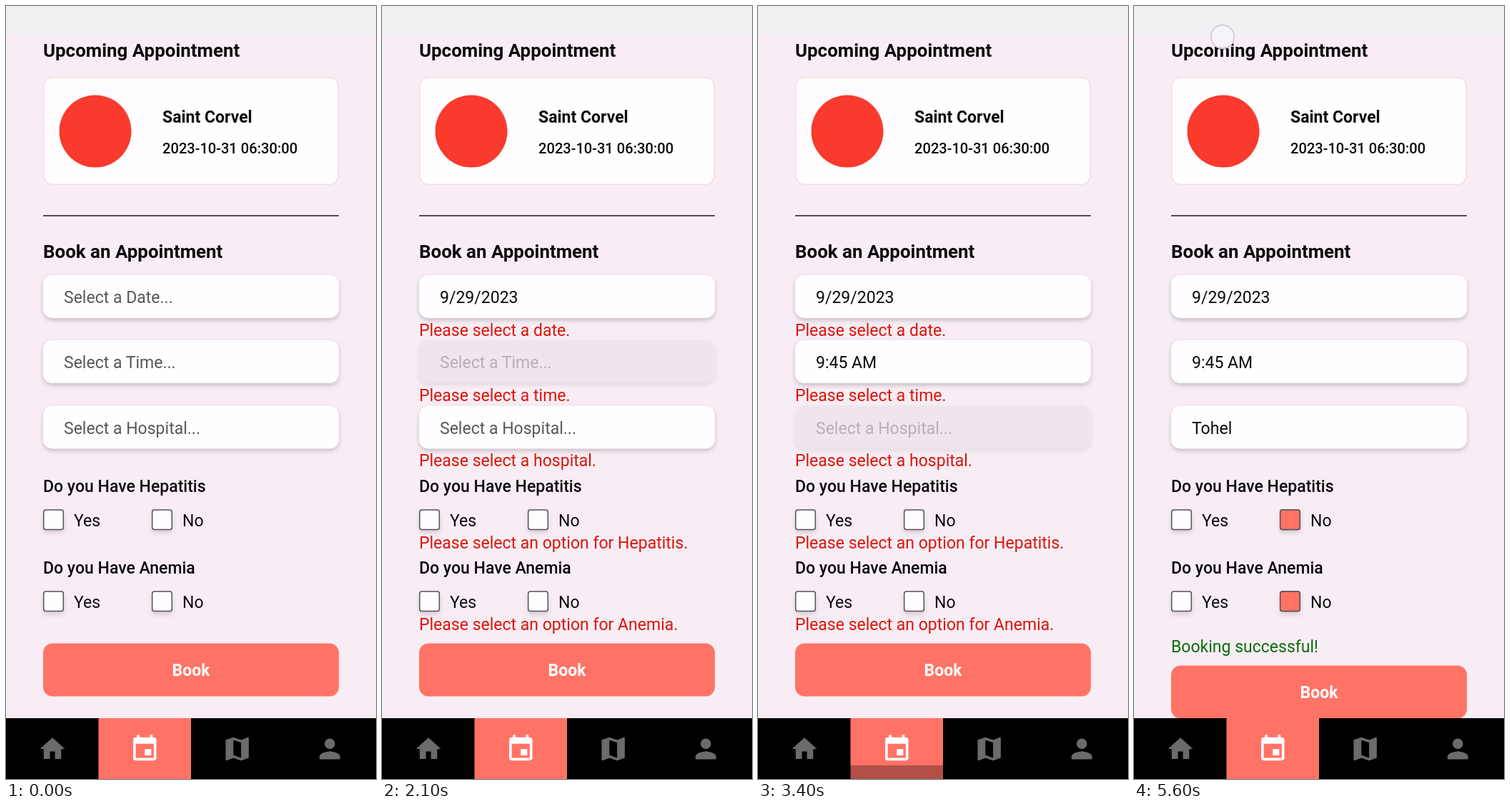
Animation, 518 px wide and 1080 px high, one loop 5.8 s. Source, as an HTML page:

```html
<!DOCTYPE html>
<html lang="en">
<head>
<meta charset="utf-8">
<title>Book an Appointment</title>
<style>
  html, body { margin: 0; width: 100%; height: 100%; overflow: hidden; background: #f8edf4; }
  svg { display: block; width: 100vw; height: 100vh; }
  text { font: 400 23.03px Roboto, sans-serif; fill: #0b0a0c; }
  .title { font-size: 25.9px; font-weight: 700; }
  .bold { font-weight: 700; }
  .med { font-weight: 500; }
  .s14 { font-size: 20.15px; font-weight: 500; }
  .s12 { font-size: 17.27px; }
  .mid { text-anchor: middle; }
  .hint { fill: #59565c; }
  .err { fill: #da160c; }
  .ok { fill: #0b6e0b; }
  .white { fill: #fff; }
  .soft { fill: #b4d0ea; }
  .grey { fill: #7d7b80; }
  .blue { fill: #126bb7; }
  .btn { letter-spacing: 1.8px; }
  .big { font-size: 48.9px; font-weight: 500; }
  .clock { font-size: 86.4px; }
  .pill { fill: #fffdff; filter: drop-shadow(0 3px 3px rgba(0, 0, 0, .2)); }
  .box { fill: #fffdff; stroke: #555257; stroke-width: 1.5; filter: drop-shadow(0 4px 3px rgba(0, 0, 0, .13)); }
  .sheet { fill: #fffdff; filter: drop-shadow(0 8px 14px rgba(0, 0, 0, .45)); }

  .press { animation: press 5.8s infinite; }
  .press .pill { animation: tint 5.8s infinite; animation-delay: inherit; }
  @keyframes press {
    0%, 7.7%, 100% { opacity: 1; }
    1.7%, 3.5% { opacity: .4; }
  }
  @keyframes tint {
    0%, 7.7%, 100% { fill: #fffdff; }
    1.7%, 3.5% { fill: #dfdce0; }
  }
  .dialog { opacity: 0; animation: dialog 5.8s infinite linear; }
  @keyframes dialog {
    0%, 19.9%, 100% { opacity: 0; }
    3.4%, 17.2% { opacity: 1; }
  }
  .slide { transform: translateY(1080px); animation: slide 5.8s 3.38s infinite cubic-bezier(.4, 0, .2, 1); }
  @keyframes slide {
    0%, 8.3%, 100% { transform: translateY(1080px); }
    4.3%, 5.5% { transform: none; }
  }
  .drop { animation: drop 5.8s infinite step-end; }
  @keyframes drop {
    0% { transform: none; }
    84.4% { transform: translateY(31px); }
  }
</style>
</head>
<body>
<svg id="stage" viewBox="0 0 518 1080" preserveAspectRatio="none"></svg>
<script>
const LOOP = 5800;

const text = (x, y, s, cls = '', more = '') => `<text x="${x}" y="${y}" class="${cls}" ${more}>${s}</text>`;
const rect = (x, y, w, h, more = '') => `<rect x="${x}" y="${y}" width="${w}" height="${h}" ${more}/>`;
const icon = (x, y, k, fill, d) =>
  `<path transform="translate(${x - 12 * k} ${y - 12 * k}) scale(${k})" fill="${fill}" d="${d}"/>`;
// Visible only between two times of the loop
const during = (from, to, body) => `<g data-on="${from} ${to}">${body}</g>`;
const pressed = (at, body) => `<g class="press" style="animation-delay:${at}ms">${body}</g>`;

const field = (y, hint, value, tap, set) => pressed(tap,
  rect(52, y, 414, 60, 'rx="13" class="pill"') +
  during(0, set, text(81, y + 39, hint, 'hint')) +
  during(set, LOOP, text(81, y + 39, value)));

const question = (y, label, set) =>
  text(52, y, label, 'med') +
  [[52, 'Yes'], [204, 'No']].map(([x, s]) =>
    rect(x + .7, y + 25, 27.6, 27.6, 'rx="3" class="box"') + text(x + 43, y + 48, s)).join('') +
  during(set, LOOP, rect(204.7, y + 25, 27.6, 27.6, 'rx="3" fill="#ff7366" stroke="#555257" stroke-width="1.5"'));

const errors = [
  [461, 'a date'], [552, 'a time'], [643, 'a hospital'],
  [758, 'an option for Hepatitis'], [872, 'an option for Anemia']
].map(([y, s]) => text(52, y, `Please select ${s}.`, 'err')).join('');

const page =
  rect(0, 0, 518, 1080, 'fill="#f8edf4"') +
  rect(0, 0, 518, 41, 'fill="#f0eff1"') +
  text(52, 71, 'Upcoming Appointment', 'title') +
  rect(52.7, 99.7, 412.6, 149.6, 'rx="13" fill="#fffdff" stroke="#f5dcde" stroke-width="1.5"') +
  '<circle cx="125" cy="175" r="50.5" fill="#f93a2d"/>' +
  text(219, 163, 'Saint Corvel', 'bold') +
  text(219, 206, '2023-10-31 06:30:00', 's14') +
  rect(52, 292.2, 414, 1.6, 'fill="#29262a"') +
  text(52, 352, 'Book an Appointment', 'title') +
  field(376, 'Select a Date...', '9/29/2023', 700, 1940) +
  field(467, 'Select a Time...', '9:45 AM', 2000, 3150) +
  field(558.6, 'Select a Hospital...', 'Tohel', 3250, 3790) +
  question(679, 'Do you Have Hepatitis', 4190) +
  question(793, 'Do you Have Anemia', 4490) +
  during(390, 4790, errors) +
  during(4895, LOOP, text(52, 903, 'Booking successful!', 'ok')) +
  '<g class="drop">' + pressed(150, pressed(4650,
    rect(52, 890.5, 414, 74, 'rx="13" fill="#ff7366"') +
    text(259, 936, 'Book', 'bold white mid'))) + '</g>';

const nav =
  rect(0, 995, 518, 85) +
  rect(129.5, 995, 129.5, 85, 'fill="#ff7366"') +
  icon(65, 1038, 1.75, '#6b6b6b', 'M10 20v-6h4v6h5v-8h3L12 3 2 12h3v8z') +
  icon(194.3, 1038, 1.8, '#fff', 'M17 12h-5v5h5v-5zM16 1v2H8V1H6v2H5c-1.11 0-1.99.9-1.99 2L3 19c0 1.1.89 2 2 2h14c1.1 0 2-.9 2-2V5c0-1.1-.9-2-2-2h-1V1h-2zm3 18H5V8h14v11z') +
  icon(323.7, 1038, 1.8, '#6b6b6b', 'M20.5 3l-.16.03L15 5.1 9 3 3.36 4.9c-.21.07-.36.25-.36.48V20.5c0 .28.22.5.5.5l.16-.03L9 18.9l6 2.1 5.64-1.9c.21-.07.36-.25.36-.48V3.5c0-.28-.22-.5-.5-.5zM15 19l-6-2.11V5l6 2.11V19z') +
  icon(453.3, 1038, 1.8, '#6b6b6b', 'M12 12c2.21 0 4-1.79 4-4s-1.79-4-4-4-4 1.79-4 4 1.79 4 4 4zm0 2c-2.67 0-8 1.34-8 4v2h16v-2c0-2.66-5.33-4-8-4z');

const dialog = (at, top, bottom, head, body) => `<g class="dialog" style="animation-delay:${at}ms">` +
  rect(0, 0, 518, 995, 'opacity=".6"') + rect(0, 995, 518, 85, 'opacity=".4"') +
  rect(52, top, 414, bottom - top, 'rx="4" class="sheet"') +
  `<path class="blue" d="M52 ${head}V${top + 4}q0-4 4-4h406q4 0 4 4V${head}z"/>` +
  body +
  text(216, bottom - 32.5, 'CANCEL', 's14 blue btn') +
  text(371, bottom - 32.5, 'OK', 's14 blue btn') + '</g>';

// Calendar: 1 September falls in the sixth column
const col = i => 106 + 50.8 * i;
const dayAt = d => [col((d + 4) % 7), 493.8 + 57.6 * Math.floor((d + 4) / 7)];
const dayText = (d, cls = '') => text(dayAt(d)[0], dayAt(d)[1] + 6.2, d, 's12 mid ' + cls);
const picked = (d, name) =>
  text(87, 286.5, `${name}, Sep ${d}`, 'big white') +
  `<circle cx="${dayAt(d)[0]}" cy="${dayAt(d)[1] + .4}" r="28.7" class="blue"/>` + dayText(d, 'white');

let calendar =
  text(87, 235, '2023', 'med soft') +
  text(258.7, 379.5, 'September 2023', 's14 mid') +
  icon(106, 373, 1.439, '#111', 'M15.41 7.41L14 6l-6 6 6 6 1.41-1.41L10.83 12z') +
  icon(412, 373, 1.439, '#111', 'M10 6L8.59 7.41 13.17 12l-4.58 4.59L10 18l6-6z') +
  [...'SMTWTFS'].map((s, i) => text(col(i), 445, s, 's12 mid grey')).join('');
for (let d = 1; d <= 30; d++) calendar += dayText(d);
calendar += during(0, 1690, picked(27, 'Wed')) + during(1690, LOOP, picked(29, 'Fri'));

// Clock face
const CX = 259, CY = 581, OUT = 129.5, IN = 78;
const onDial = (i, r) => [CX + r * Math.sin(i * Math.PI / 6), CY - r * Math.cos(i * Math.PI / 6)];
const label = (i, r, s, cls) => {
  const [x, y] = onDial(i, r);
  return text(x.toFixed(1), (y + (r === OUT ? 8.3 : 6.2)).toFixed(1), s, 'mid ' + cls);
};
const pad = n => String(n).padStart(2, '0');
const hours = Array.from({ length: 12 }, (_, i) =>
  label(i, OUT, i || 12, '') + label(i, IN, i ? i + 12 : '00', 's12 grey')).join('');
const minutes = Array.from({ length: 12 }, (_, i) => label(i, OUT, pad(i * 5), '')).join('');
const hand = (i, r, s) => {
  const [x, y] = onDial(i, r);
  return `<path d="M${CX} ${CY}L${x} ${y}" stroke="#126bb7" stroke-width="2.9"/>` +
    `<circle cx="${CX}" cy="${CY}" r="4.6" class="blue"/><circle cx="${x}" cy="${y}" r="28.7" class="blue"/>` +
    label(i, r, s, r === IN ? 's12 white' : 'white');
};
const time = (h, hc, mc) => text(260, 362, `<tspan class="${hc}">${h}</tspan><tspan class="soft">:</tspan><tspan class="${mc}">45</tspan>`, 'clock mid');

const clock =
  `<circle cx="${CX}" cy="${CY}" r="161" fill="#eeeaee"/>` +
  during(0, 2590, time('16', 'white', 'soft') + hours + hand(4, IN, '16')) +
  during(2590, 2740, time('09', 'white', 'soft') + hours + hand(9, OUT, '9')) +
  during(2740, LOOP, time('09', 'soft', 'white') + minutes + hand(9, OUT, '45')) +
  icon(104, 783, 1.439, '#b1afb3', 'M20 5H4c-1.1 0-1.99.9-1.99 2L2 17c0 1.1.9 2 2 2h16c1.1 0 2-.9 2-2V7c0-1.1-.9-2-2-2zm-9 3h2v2h-2V8zm0 3h2v2h-2v-2zM8 8h2v2H8V8zm0 3h2v2H8v-2zm-1 2H5v-2h2v2zm0-3H5V8h2v2zm9 7H8v-2h8v2zm0-4h-2v-2h2v2zm0-3h-2V8h2v2zm3 3h-2v-2h2v2zm0-3h-2V8h2v2z');

const hospitals = '<g class="slide">' +
  rect(0, 0, 518, 1080, 'opacity=".3"') +
  rect(52, 450, 414, 180, 'rx="13" fill="#fffdff"') +
  ['Saint Corvel', 'Tohel'].map((s, i) => text(259, 508 + 80 * i, s, 'mid')).join('') + '</g>';

const touch = during(5590, LOOP,
  '<circle cx="124" cy="43" r="16.3" fill="#f6f4f9" fill-opacity=".86" stroke="#cfcbd3" stroke-width="1.8"/>');

const stage = document.getElementById('stage');
stage.innerHTML = page + nav +
  dialog(900, 190, 891.5, 324, calendar) +
  dialog(2150, 259, 824, 397, clock) +
  hospitals + touch;

// One keyframe rule for each window of visibility
const style = document.createElement('style');
const pct = ms => (ms / LOOP * 100).toFixed(3) + '%';
stage.querySelectorAll('[data-on]').forEach(el => {
  const [from, to] = el.dataset.on.split(' ').map(Number);
  const name = `on-${from}-${to}`;
  style.textContent += `@keyframes ${name}{0%{opacity:${from ? 0 : 1}}` +
    (from ? `${pct(from)}{opacity:1}` : '') +
    (to < LOOP ? `${pct(to)}{opacity:0}` : '') +
    `100%{opacity:${to < LOOP ? 0 : 1}}}`;
  el.style.animation = `${name} ${LOOP}ms infinite step-end`;
});
document.head.append(style);
</script>
</body>
</html>
```
